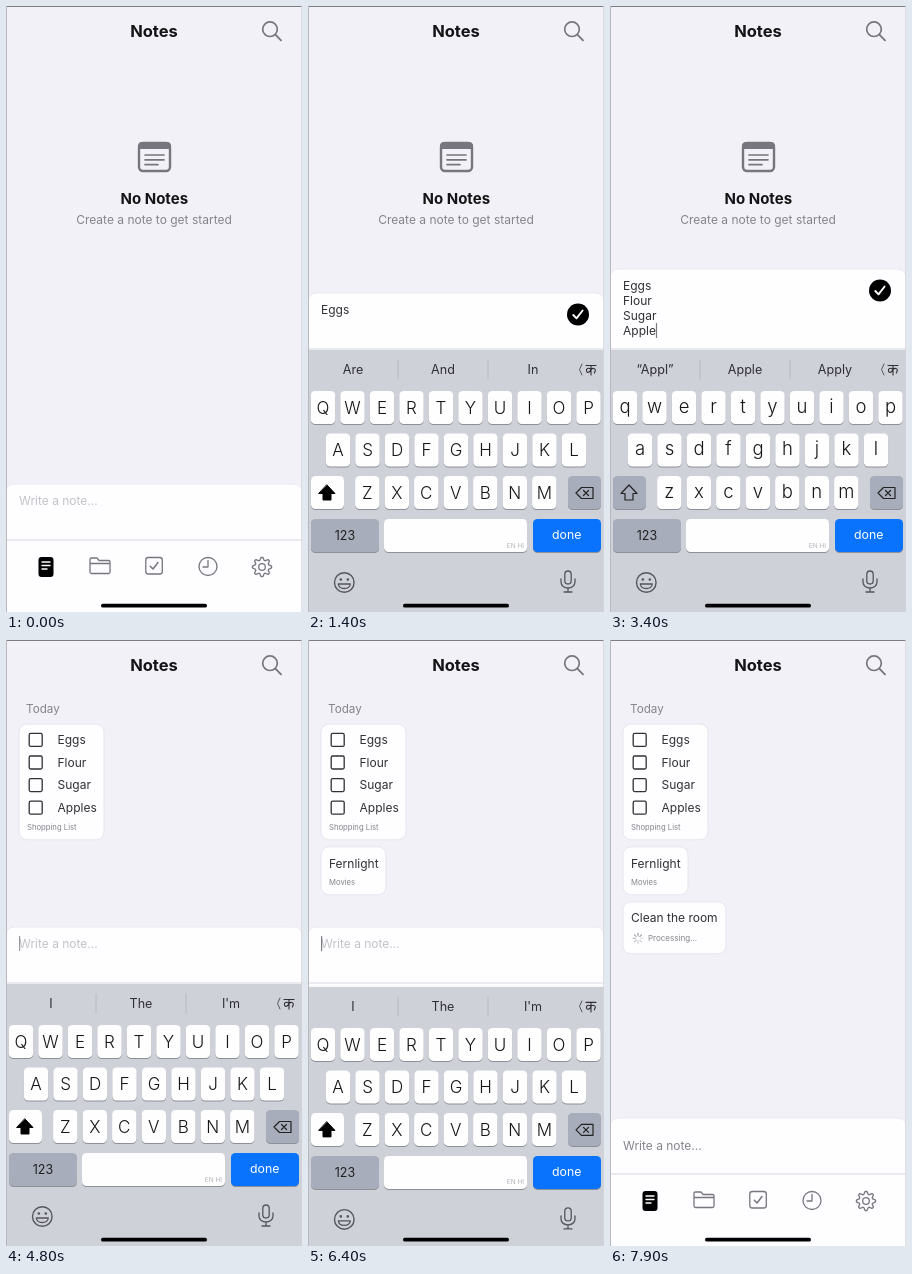
An HTML page for the animation above (8 s loop, 296 px wide and 606 px high).

```html
<!DOCTYPE html>
<html lang="en">
<head>
<meta charset="utf-8">
<title>Notes</title>
<style>
  html, body { margin: 0; width: 100%; height: 100%; overflow: hidden; background: #f2f1f7; }
  svg { display: block; width: 100vw; height: 100vh; }
  text { font-family: Inter, Roboto, sans-serif; white-space: pre; }
  .line { fill: none; stroke-linecap: round; stroke-linejoin: round; }
</style>
</head>
<body>
<svg id="stage" viewBox="0 0 296 606"></svg>
<script>
const LOOP = 8000, TRAVEL = 191, KEYBOARD_HEIGHT = 262;
const INK = '#303035', GREY = '#77767e';

const sessions = [
  { from: 0, to: 3700, parts: [['Eggs\n', 740, 140], ['Flour\n', 1500, 130], ['Sugar\n', 2260, 125], ['Apples', 2990, 98]] },
  { from: 4230, to: 5700, parts: [['Fernlight', 4900, 75]] },
  { from: 6170, to: 7600, parts: [['Clean the r', 6560, 72], ['oom', 7480, 0]] }
];
const notes = [
  { lines: ['Eggs', 'Flour', 'Sugar', 'Apples'], label: 'Shopping List', list: true, width: 85, born: 3740, sorted: 4150 },
  { lines: ['Fernlight'], label: 'Movies', width: 65, born: 5740, sorted: 6050 },
  { lines: ['Clean the room'], width: 103, born: 7640, sorted: Infinity }
];
const vocabulary = ('Eggs Egg Every Flour Flow For Sugar Sugary So Apple Apply And ' +
  'Fern Fernlight From Clean Cleaning Can the them this room refrigerator').split(' ');

const rect = (x, y, w, h, r, fill, more = '') =>
  `<rect x="${x}" y="${y}" width="${w}" height="${h}" rx="${r}" fill="${fill}" ${more}/>`;
const path = (d, color = GREY, width = 1.3, fill = 'none') =>
  `<path class="line" d="${d}" stroke="${color}" stroke-width="${width}" style="fill:${fill}"/>`;
const circle = (x, y, r, fill, stroke = 'none', width = 1.3) =>
  `<circle cx="${x}" cy="${y}" r="${r}" fill="${fill}" stroke="${stroke}" stroke-width="${width}"/>`;
const escapeText = s => s.replace(/&/g, '&amp;').replace(/</g, '&lt;');
const label = (s, x, y, size = 12, fill = INK, anchor = 'start', weight = 400) =>
  `<text x="${x}" y="${y}" font-size="${size}" fill="${fill}" text-anchor="${anchor}" font-weight="${weight}">${escapeText(s)}</text>`;
const group = (id, content) => `<g id="${id}">${content}</g>`;

function key(x, y, w, fill = '#fefeff') {
  return rect(x, y + 1, w, 33, 4.5, '#8d9097') + rect(x, y, w, 33, 4.5, fill);
}

function letters(rows, size, drop) {
  return rows.map((row, r) => [...row].map((c, i) =>
    label(c, 15 + [0, 15, 44.3][r] + i * 29.5, 401.5 + r * 42.5 + drop, size, '#17171a', 'middle', 350)).join('')).join('');
}

function keyboard() {
  const rows = ['QWERTYUIOP', 'ASDFGHJKL', 'ZXCVBNM'];
  const keys = rows.map((row, r) => [...row].map((c, i) =>
    key(2.8 + [0, 15, 44.3][r] + i * 29.5, 385 + r * 42.5, 24.4)).join('')).join('');
  const arrow = 'M19 479L27 487.5H23V494H15V487.5H11Z';
  const dark = '#a7adba';
  return rect(0, 344, 296, KEYBOARD_HEIGHT, 0, '#cfd1d9') + group('suggestions', '') +
    path('M90 354V373M180 354V373', '#b7bac2', 1) +
    path('M274 358L271.5 363.5L274 369', '#55565c', 1) +
    path('M278 359.5H288M283 359.5V369M283 363.5C280 361 278 363 278.5 365C279 367.5 282 366.5 283 363.5C285 361.5 287.5 362.5 287.3 364.7L286.3 367', INK, 1.1) +
    keys +
    group('upper', key(3, 470, 33) + path(arrow, '#000', 1, '#000') + letters(rows, 17, 6.2)) +
    group('lower', key(3, 470, 33, dark) + path(arrow, '#222', 1.2) + letters(rows.map(r => r.toLowerCase()), 18.5, 5.4)) +
    key(260, 470, 33, dark) +
    path('M268 487L273.5 481.5H285V492.5H273.5ZM275.5 484.5L280.5 489.5M280.5 484.5L275.5 489.5', '#222', 1.2) +
    key(3, 513, 68, dark) + label('123', 37, 533.7, 12.5, '#222', 'middle') +
    key(76, 513, 143) + label('EN HI', 216, 541.5, 6.5, '#b4b5bb', 'end') +
    key(225, 513, 68, '#0a73fd') + label('done', 258.7, 532.7, 12.3, '#fff', 'middle') +
    circle(36.3, 576.5, 9.8, 'none', '#55565c', 1.4) +
    circle(32.8, 573.5, 1.3, '#55565c') + circle(39.8, 573.5, 1.3, '#55565c') +
    path('M30.3 578H42.3C41.5 584 31 584 30.3 578Z', '#55565c', 1.3) +
    rect(256.8, 565, 6.4, 13, 3.2, 'none', 'stroke="#55565c" stroke-width="1.3"') +
    path('M253 573V576C253 584 267 584 267 576V573M260 582V586M256 586H264', '#55565c', 1.3);
}

function gear(cx, cy) {
  const points = [];
  for (let i = 0; i < 64; i++) {
    const a = i / 64 * 2 * Math.PI;
    const r = 8.3 + 1.3 * Math.tanh(3 * Math.cos(8 * a));
    points.push(`${(cx + r * Math.cos(a)).toFixed(2)} ${(cy + r * Math.sin(a)).toFixed(2)}`);
  }
  return path(`M${points.join('L')}Z`) + circle(cx, cy, 3.3, 'none', GREY);
}

function tabBar() {
  return rect(0, 534, 296, 80, 0, '#fefdff') + rect(0, 533.6, 296, 1, 0, '#e6e5eb') +
    rect(32.5, 551, 15, 20, 3, '#000') +
    path('M36 556H44M36 559.5H44M36 563H41', '#fff', 1.4) +
    path('M84 566V553.5Q84 552 85.5 552H91L93 554.5H102.5Q104 554.5 104 556V566Q104 567.5 102.5 567.5H85.5Q84 567.5 84 566ZM84 557.5H104') +
    rect(139.8, 551.5, 16.5, 16.5, 2.5, 'none', `stroke="${GREY}" stroke-width="1.3"`) +
    path('M144.3 560.3L147 563L152 556.5', GREY, 1.5) +
    circle(202, 560.5, 9, 'none', GREY) + path('M202 554.5V561H197') + gear(256, 561);
}

const stage = document.getElementById('stage');
stage.innerHTML =
  rect(0, 0, 296, 606, 0, '#f2f1f7') +
  label('Notes', 148, 31, 16.5, '#151517', 'middle', 650) +
  circle(264, 23.2, 7.3, 'none', GREY, 1.7) + path('M269.4 28.7L275 34.3', GREY, 1.9) +
  group('empty',
    rect(133, 137, 31, 28, 4, 'none', `stroke="${GREY}" stroke-width="2.4"`) +
    path('M133 142V140Q133 137 136 137H161Q164 137 164 140V142Z', GREY, 2, GREY) +
    path('M139 149H158M139 153.8H158M139 158.6H152', GREY, 1.7) +
    label('No Notes', 148.3, 198, 15, '#151517', 'middle', 650) +
    label('Create a note to get started', 148, 218, 12, '#85848b', 'middle')) +
  group('cards', '') +
  group('dock', tabBar() + group('panel', '')) +
  group('keyboard', keyboard()) +
  rect(95, 597.8, 106, 3.8, 1.9, '#000') +
  rect(0, 0, 296, 1, 0, '#7d7d82') + rect(0, 0, 1, 606, 0, '#b9b8be') + rect(295.3, 0, 1, 606, 0, '#d4d3d9') +
  `<text id="ruler" font-size="12" visibility="hidden"></text>`;

const el = {};
stage.querySelectorAll('[id]').forEach(node => el[node.id] = node);
const show = (node, on) => node.setAttribute('display', on ? 'inline' : 'none');
const clamp = v => Math.max(0, Math.min(1, v));

function measure(s) {
  el.ruler.textContent = s;
  return s ? el.ruler.getComputedTextLength() : 0;
}

const activeSession = t => sessions.find(s => t >= s.from && t < s.to);

function typed(t) {
  const session = activeSession(t);
  if (!session) return '';
  return session.parts.map(([text, start, step]) =>
    [...text].filter((c, i) => t >= start + i * step).join('')).join('');
}

// How far the keyboard is down: 0 is open, 1 is hidden.
function lowered(t, power) {
  let last = sessions[0];
  for (const s of sessions) if (t >= s.from) last = s;
  if (t >= last.to) return 1 - Math.pow(1 - clamp((t - last.to) / 250), 3);
  const begin = last.from === 0 ? 80 : last.from;
  return Math.pow(1 - clamp((t - begin) / 297), power);
}

function suggestions(text) {
  if (!text) return ['I', 'The', "I'm"];
  if (text.endsWith('\n')) return ['Are', 'And', 'In'];
  if (text.endsWith(' ')) return ['the', 'up', 'and'];
  const word = text.split(/\s/).pop();
  const matches = vocabulary.filter(v => v.startsWith(word));
  return [`“${word}”`, matches[0] || word, matches[1] || ''];
}

function spinner(x, y, t) {
  const turn = Math.floor(t / 100) % 8;
  return [...Array(8).keys()].map(i => {
    const a = i * Math.PI / 4, c = Math.cos(a), s = Math.sin(a);
    const shade = 150 + (turn - i + 8) % 8 * 9;
    return path(`M${x + 2.5 * c} ${y + 2.5 * s}L${x + 5 * c} ${y + 5 * s}`, `rgb(${shade},${shade},${shade + 4})`, 1.1);
  }).join('');
}

function drawCards(t) {
  const visible = notes.filter(n => t >= n.born);
  if (!visible.length) return '';
  let y = 84, out = label('Today', 20, 73, 11.7, '#85848b');
  for (const n of visible) {
    const sorted = t >= n.sorted, ticks = sorted && n.list;
    const gap = ticks ? 22.6 : 15;
    const height = (sorted ? 48 : 52) + (n.lines.length - 1) * gap;
    out += rect(13, y, n.width, height, 8, '#fefdff', 'stroke="#e7e5ee" stroke-width="1"');
    n.lines.forEach((line, i) => {
      const base = y + (ticks ? 20 : sorted ? 21 : 20) + i * gap;
      if (ticks) out += rect(23.2, base - 10.6, 13, 13, 1.5, 'none', `stroke="${INK}" stroke-width="1.3"`);
      out += label(line, ticks ? 51.5 : 21, base);
    });
    const foot = y + height;
    out += sorted ? label(n.label, 21, foot - 9.5, 7.7, '#85848b')
      : spinner(28, foot - 15.5, t) + label('Processing...', 38, foot - 12.8, 8, '#85848b');
    y += height + 7;
  }
  return out;
}

function drawPanel(t, text) {
  const lines = text.split('\n');
  const top = 534 - Math.max(56, 20 + lines.length * 15);
  const focused = !!activeSession(t);
  let out = path(`M0 534V${top + 9}Q0 ${top} 9 ${top}H287Q296 ${top} 296 ${top + 9}V534Z`, '#eceaf1', 1, '#fefdff') +
    rect(1, 533, 295, 1, 0, '#e9e8ee');
  if (!text) out += label('Write a note...', 13, top + (focused ? 20.5 : 32), 12, focused ? '#c3c2c8' : '#85848b');
  lines.forEach((line, i) => out += label(line, 13, top + 20.5 + i * 15));
  if (text) {
    out += circle(270, top + 21.5, 11, '#000') +
      path(`M265.3 ${top + 22}L268.5 ${top + 25.3}L274.6 ${top + 17.5}`, '#fff', 1.9);
  }
  if (focused && t > 80) {
    const glow = clamp(0.5 + 0.6 * Math.cos(2 * Math.PI * (t - 480) / 600));
    const x = 13 + measure(lines[lines.length - 1]);
    const y = top + 9 + (lines.length - 1) * 15;
    out += rect(x, y, 1.2, 15, 0, '#6f6e75', `opacity="${glow}"`);
  }
  return out;
}

function render(t) {
  const text = typed(t);
  const caps = !text || text.endsWith('\n');
  show(el.empty, t < notes[0].born);
  show(el.upper, caps);
  show(el.lower, !caps);
  el.cards.innerHTML = drawCards(t);
  el.panel.innerHTML = drawPanel(t, text);
  el.suggestions.innerHTML = suggestions(typed(t - 60))
    .map((s, i) => label(s, 45 + i * 90, 368, 12.6, INK, 'middle')).join('');
  el.dock.setAttribute('transform', `translate(0 ${-TRAVEL * (1 - lowered(t, 5))})`);
  el.keyboard.setAttribute('transform', `translate(0 ${KEYBOARD_HEIGHT * lowered(t, 3)})`);
}

const origin = performance.now();
function tick() {
  render((performance.now() - origin) % LOOP);
  requestAnimationFrame(tick);
}
tick();
</script>
</body>
</html>
```
